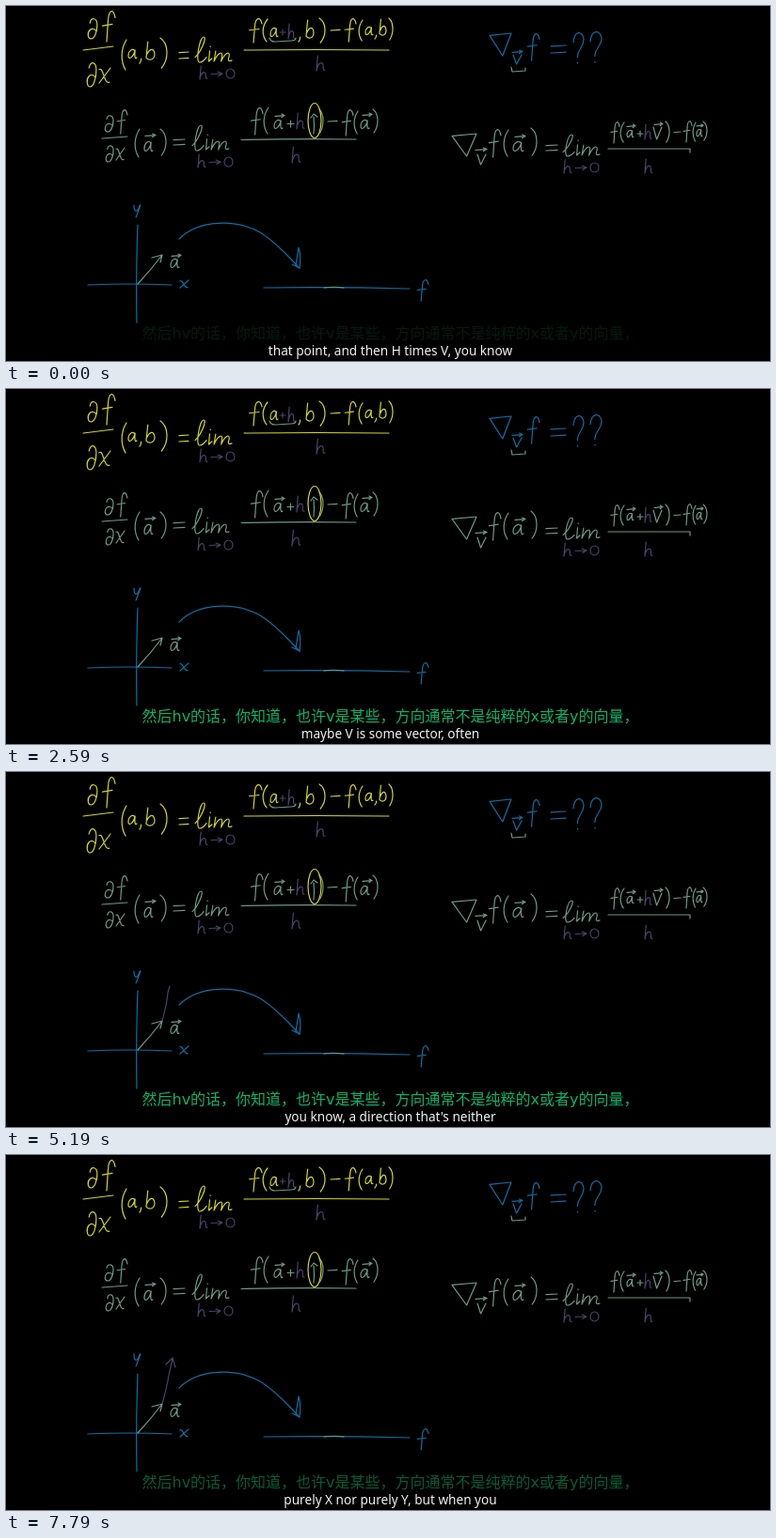
Write an HTML page that moves like this. It is 812 by 378 pixels and loops after 8 s.

```html
<!DOCTYPE html>
<html lang="zh-CN">
<head>
<meta charset="utf-8">
<title>Directional derivative</title>
<style>
  html, body { margin: 0; width: 100%; height: 100%; overflow: hidden; background: #000; }
  svg { display: block; width: 812px; height: 378px; }
  path, ellipse { fill: none; stroke-width: 1.2; stroke-linecap: round; stroke-linejoin: round; vector-effect: non-scaling-stroke; }
  .gold { stroke: #d3d62c; }
  .green { stroke: #6f9a84; }
  .blue { stroke: #106fa2; }
  .purple { stroke: #4b4267; }
  text { text-anchor: middle; }
  .en { font: 13.6px "Noto Sans", "Open Sans", sans-serif; fill: #f2f2f2; }
  .zh { font: 500 16px "DejaVu Sans", "Noto Sans CJK SC", "Noto Sans CJK", sans-serif; fill: #0bb36c; }
  .timed { animation: 8s step-end infinite; opacity: 0; }

  .zh { animation-name: zh; }
  .s1 { animation-name: s1; }
  .s2 { animation-name: s2; }
  .s3, .shaft { animation-name: s3; }
  .s4, .vector { animation-name: s4; }
  .dot1 { animation-name: dot1; }
  .dot2 { animation-name: dot2; }
  .dot3 { animation-name: dot3; }

  @keyframes zh { 0% { opacity: .15 } 10.75% { opacity: 1 } 97.375%, 100% { opacity: .52 } }
  @keyframes s1 { 0% { opacity: 1 } 21.625%, 100% { opacity: 0 } }
  @keyframes s2 { 0% { opacity: 0 } 21.625% { opacity: 1 } 64.875%, 100% { opacity: 0 } }
  @keyframes s3 { 0% { opacity: 0 } 64.875% { opacity: 1 } 75.625%, 100% { opacity: 0 } }
  @keyframes s4 { 0% { opacity: 0 } 75.625%, 100% { opacity: 1 } }
  @keyframes dot1 { 0% { opacity: 0 } 10.75% { opacity: 1 } 21.625%, 100% { opacity: 0 } }
  @keyframes dot2 { 0% { opacity: 0 } 43.125% { opacity: 1 } 54.125%, 100% { opacity: 0 } }
  @keyframes dot3 { 0% { opacity: 0 } 86.375% { opacity: 1 } 97.375%, 100% { opacity: 0 } }
</style>
</head>
<body>
<svg viewBox="0 0 812 378">
  <g id="ink"></g>

  <g class="gold">
    <path d="M82 47L114 43M253 47Q330 46 407 47"/>
    <ellipse cx="328" cy="122" rx="7" ry="18.5"/>
  </g>
  <g class="green">
    <path d="M280 34Q281 38 286 38L303 37Q308 37 308 34"/>
    <path d="M102 141L129 139M250 142.500Q312 141 372 142M640 152L727 152L727 156"/>
    <path d="M327 118Q328 127 327 136M324 119L327 115L331 118"/>
    <path d="M537 65L538 70L552 69L552 66"/>
  </g>

  <g class="blue">
    <path d="M140 233Q138 285 139 337M87 297Q130 295 176 297"/>
    <path d="M184 248C205 227 245 227 270 241C288 252 300 267 312 279"/>
    <path d="M304 275L312 279Q314 267 311 257L308 276"/>
    <path d="M274 300Q350 299 429 301"/>
  </g>
  <path class="green" d="M140 296Q154 281 166 265M155 268L166 265L164 273M338 300Q348 298.500 359 300"/>
  <path class="purple timed shaft" d="M166 265Q171 247 172 235L174 228"/>
  <path class="purple timed vector" d="M166 265Q171 247 173 235L177 217M170 223L177 216L180 226"/>
  <circle class="timed dot1" cx="377" cy="170" r=".7" fill="#555"/>
  <circle class="timed dot2" cx="185" cy="281" r=".7" fill="#555"/>
  <circle class="timed dot3" cx="221.500" cy="260" r=".8" fill="#665a82"/>

  <text class="zh timed" x="408.5" y="354">然后hv的话，你知道，也许v是某些，方向通常不是纯粹的x或者y的向量，</text>
  <text class="en timed s1" x="408.5" y="372">that point, and then H times V, you know</text>
  <text class="en timed s2" x="408.5" y="372">maybe V is some vector, often</text>
  <text class="en timed s3" x="408.5" y="372">you know, a direction that's neither</text>
  <text class="en timed s4" x="408.5" y="372">purely X nor purely Y, but when you</text>
</svg>
<script>
// Pen strokes of each character in a 10 by 10 box.
const glyphs = {
  d: 'M2 2C3 -1 9 -1 9 3C9 7 6 10 3 10C0 10 -1 7 2 5.500C4 4.500 7 5 8 6',
  f: 'M10 2C9 -1 5.500 -1 5 3L4 10M1 4.700L8 4.200',
  x: 'M0 1C4 -1 4 11 9 9.500M10 0L0 10',
  y: 'M0 0C0 6 5 7 9 0M10 0L3 10',
  '(': 'M10 0C-2 3 -3 7 8 10',
  ')': 'M0 0C13 2 13 7 2 10',
  a: 'M8 2C5 -2 0 2 0 7C0 12 6 9 8 1C7 8 8 11 10 9',
  b: 'M2 0L0 9C4 11 10 10 10 7C9 3 4 4 1 7',
  h: 'M1.500 0L0 10C1 6 4 4 7 5C9.500 6 6 10 10 9.500',
  ',': 'M8 0Q9 6 0 10',
  '=': 'M0 1L10 0M0 10L10 9',
  '-': 'M0 5L10 4',
  '+': 'M0 5L10 5M5 0L5 10',
  l: 'M0 8C5 6 11 0 7.500 0C4 0 0 10 4 10Q7 10 10 8',
  i: 'M5 3L3 10L10 8M6 0L6.500 .2',
  m: 'M1 0L0 10C2 2 5 -1 4.500 5L4 10C6 2 9 -1 8.500 5Q7 11 10 9',
  '0': 'M5 0C-1.600 0 -1.600 10 5 10C11.600 10 11.600 0 5 0',
  v: 'M0 0L4 10L10 0',
  N: 'M0 1L10 0L6 10L0 1',
  '?': 'M0 3C1 -1 9 -1 10 2C10 5 4 5 4 8M4 9.800L4.300 10',
  '>': 'M0 5L10 4M6 0L10 4L6.500 9',
  vec: 'M0 6L10 4M7 0L10 4L7 9'
};
const ink = document.getElementById('ink');

// Each item reads: character, left, top, width, height.
function write(color, items) {
  for (const item of items.trim().split(/\s*;\s*/)) {
    const [name, x, y, w, h] = item.split(/\s+/);
    const path = document.createElementNS('http://www.w3.org/2000/svg', 'path');
    path.setAttribute('class', color);
    path.setAttribute('d', glyphs[name]);
    path.setAttribute('transform', `translate(${x} ${y}) scale(${w / 10} ${h / 10})`);
    ink.append(path);
  }
}

function limit(color, x, y, h, hx, hy) {
  write(color, `l ${x} ${y} 12 ${h}; i ${x + 13} ${y + h - 17} 5 16; m ${x + 20} ${y + h - 12} 19 11`);
  write('purple', `h ${hx} ${hy} 8 14; > ${hx + 12} ${hy + 6} 12 5; 0 ${hx + 28} ${hy + 3} 9 10`);
}

// Partial derivative with coordinates
write('gold', 'd 87 14 11 21; f 101 6 15 32; d 86 61 11 25; x 99 66 12 16');
write('gold', '( 123 36 5 32; a 130 46 9 10; , 142 56 2 5; b 149 38 9 19; ) 164 34 7 32; = 184 49 10 7');
limit('gold', 201, 33, 27, 206, 64);
write('gold', 'f 257 14 15 25; ( 273 14 5 24; a 281 23 8 10; , 311 33 2 5; b 319 15 8 19; ) 333 13 6 26; - 345 23 10 6');
write('gold', 'f 359 14 13 24; ( 375 15 4 22; a 382 22 8 9; , 392 31 2 4; b 397 14 7 17; ) 407 13 4 23');
write('purple', '+ 291 25 6 6; h 300 19 7 16; h 330 53 9 16');

// Partial derivative with vectors
write('green', 'd 105 117 10 17; f 117 111 12 25; d 106 149 9 17; x 117 151 9 13');
write('green', '( 137 131 5 30; a 147 144 9 11; vec 148 136 11 4; ) 164 131 6 28; = 178 142 12 6');
limit('green', 198, 127, 27, 204, 158);
write('green', 'f 259 109 14 28; ( 274 108 5 28; a 285 121 9 10; vec 286 115 10 4; + 299 122 7 7; ) 333 110 4 25; - 342 120 10 6');
write('green', 'f 356 111 13 27; ( 370 112 4 24; a 377 121 9 10; vec 379 114 10 4; ) 390 110 5 25');
write('purple', 'h 309 114 8 17; h 304 150 9 17');

// Directional derivative
write('blue', 'N 514 29 23 24; v 539 52 9 10; vec 538 47 11 4; f 553 30 14 28; = 579 42 16 8; ? 603 29 11 32; ? 621 28 12 32');
write('green', 'N 474 136 26 24; v 501 158 9 11; vec 499 151 12 4; f 512 132 14 29');
write('green', '( 529 132 5 28; a 539 144 11 11; vec 541 137 11 4; ) 558 130 6 29; = 574 148 12 6');
limit('green', 592, 137, 23, 593, 164);
write('green', 'f 642 124 10 22; ( 653 124 4 21; a 660 132 7 8; vec 660 126 9 4; + 671 133 6 6; v 688 129 9 13; vec 689 124 9 4; ) 701 123 4 22');
write('green', '- 710 132 7 5; f 719 123 10 22; ( 730 124 3 20; a 734 131 6 8; vec 734 126 7 3; ) 741 123 4 20');
write('purple', 'h 679 126 7 16; h 679 163 8 15');

// Labels of the sketch
write('blue', 'y 136 212 7 13; x 185 292 9 8; f 436 292 13 22');
write('green', 'a 175 269 9 10; vec 176 264 10 4');
</script>
</body>
</html>
```
